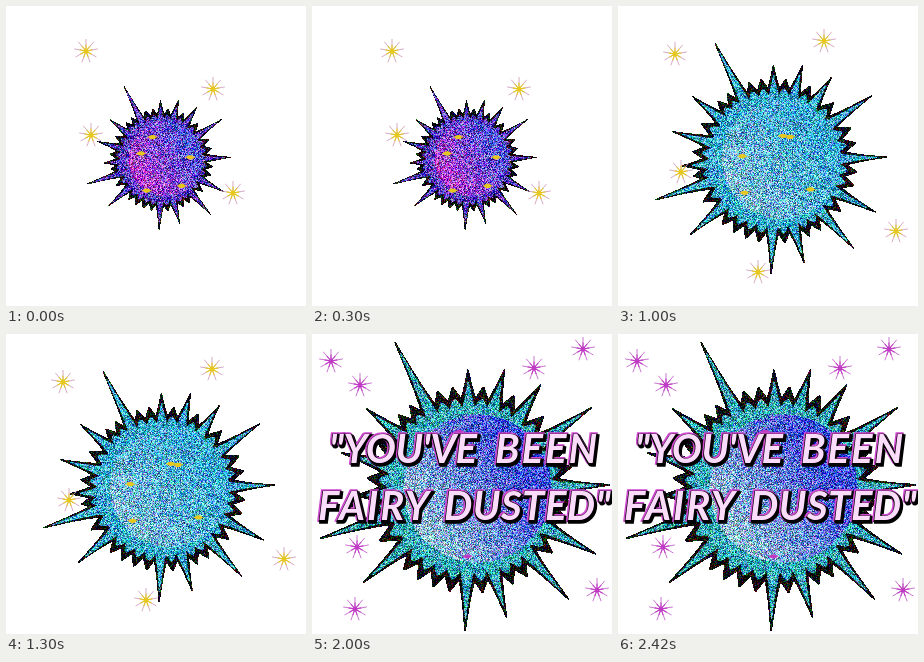
These frames come from a looping animation (300x300 px, 2.7 s). An HTML page with a canvas:

```html
<!DOCTYPE html>
<html lang="en">
<head>
<meta charset="utf-8">
<title>Fairy dust</title>
<style>
html, body { margin: 0; width: 100%; height: 100%; overflow: hidden; background: #fff; }
canvas { display: block; }
</style>
</head>
<body>
<canvas id="stage" width="300" height="300"></canvas>
<script>
const SIZE = 300, RADIUS = 70, TAU = Math.PI * 2;

// Long spikes as [angle in degrees, reach]; short ones fill the gaps between them.
const LONG_SPIKES = [[-2, 112], [27, 113], [48, 118], [74, 106], [92, 113], [139, 113], [162, 126],
  [177, 93], [196, 107], [218, 105], [243, 132], [269, 96], [286, 100], [304, 101], [326, 117]];
const SPIKES = LONG_SPIKES.flatMap(([angle, reach], i) => {
  const next = LONG_SPIKES[i + 1]?.[0] ?? LONG_SPIKES[0][0] + 360;
  const steps = Math.round((next - angle) / 9.5);
  return Array.from({ length: steps }, (_, k) =>
    [(angle + (next - angle) * k / steps) * TAU / 360, k ? 83 : reach]);
});

const GOLD = { ray: '#d3a0c0', core: '#e6c81e', edge: '#e8c93c', fill: '#fff3b0' };
const PINK = { ray: '#c568cc', core: '#c03cc4', edge: '#d048d0', fill: '#fbdcfa' };
const LAST_STARS = [[19, 27], [48, 51], [222, 34], [271, 15], [45, 213], [43, 275], [285, 256]];

// ball: shades from lower left to upper right
const SCENES = [
  { hold: 500, scale: .625, body: '#5c3cc8', ball: ['#b43cd0', '#4c50e0'], tint: GOLD,
    stars: [[80, 45], [207, 83], [85, 129], [227, 187]] },
  { hold: 500, scale: .828, body: '#b83cc8', ball: ['#c040cc', '#b03cc8'], tint: GOLD,
    stars: [[86, 85], [232, 76], [267, 175], [52, 222], [197, 243]] },
  { hold: 500, scale: 1, body: '#34a8d0', ball: ['#7cb8dc', '#38a8dc'], tint: GOLD,
    stars: [[57, 48], [206, 35], [63, 166], [278, 225], [140, 266]] },
  { hold: 500, scale: 1.254, body: '#b23cc0', ball: ['#c44cc8', '#b840bc'], tint: GOLD,
    stars: LAST_STARS, text: true },
  { hold: 700, scale: 1.254, body: '#32a6b8', ball: ['#92bedc', '#3448e2'], tint: PINK,
    stars: LAST_STARS, text: true }
];
const LOOP = SCENES.reduce((sum, scene) => sum + scene.hold, 0);

function makeRandom(seed) {
  return () => {
    seed = (seed + 0x6D2B79F5) | 0;
    let t = Math.imul(seed ^ (seed >>> 15), 1 | seed);
    t = (t + Math.imul(t ^ (t >>> 7), 61 | t)) ^ t;
    return ((t ^ (t >>> 14)) >>> 0) / 4294967296;
  };
}

function disc(g, x, y, r, fill) {
  g.fillStyle = fill;
  g.beginPath();
  g.arc(x, y, r, 0, TAU);
  g.fill();
}

function burstLayer(g, color, inset) {
  const base = RADIUS - inset, half = 8.5 - inset * .6;
  disc(g, 0, 0, base, color);
  for (const [angle, reach] of SPIKES) {
    g.save();
    g.rotate(angle);
    g.beginPath();
    g.moveTo(base - 3, -half);
    g.quadraticCurveTo(base + 5, -half * .55, reach - inset * 2.5, -.6);
    g.lineTo(reach - inset * 2.5, .6);
    g.quadraticCurveTo(base + 5, half * .55, base - 3, half);
    g.fill();
    g.restore();
  }
}

function drawBurst(g, { scale, body, ball }) {
  g.save();
  g.translate(153, 152);
  g.scale(scale, scale);
  g.translate(4, 3);
  burstLayer(g, '#000', 0);
  burstLayer(g, body, 4);
  const shade = g.createLinearGradient(-40, 24, 42, -30);
  ball.forEach((color, i) => shade.addColorStop(i, color));
  disc(g, 6, -1, 59, shade);
  g.restore();
}

function addGlitter(g, random) {
  const image = g.getImageData(0, 0, SIZE, SIZE), d = image.data;
  for (let i = 0; i < d.length; i += 4) {
    d[i + 3] = d[i + 3] > 110 ? 255 : 0;
    const dark = d[i] + d[i + 1] + d[i + 2] < 90;
    const light = dark ? -90 : (random() - .5) * 170;
    for (let c = 0; c < 3; c++) d[i + c] += light + (random() - .5) * (dark ? 420 : 140);
  }
  g.putImageData(image, 0, 0);
}

function drawStar(g, x, y, { ray, core }) {
  const rays = (color, width, length) => {
    g.strokeStyle = color;
    g.lineWidth = width;
    g.beginPath();
    for (let i = 0; i < 9; i++) {
      const a = i * TAU / 9 - TAU / 4;
      g.moveTo(x, y);
      g.lineTo(x + Math.cos(a) * length, y + Math.sin(a) * length);
    }
    g.stroke();
  };
  rays(ray, .9, 12);
  rays(core, 1.1, 6.5);
  disc(g, x, y, 2.4, core);
}

function drawGlints(g, { scale, tint }, random) {
  for (let i = 0; i < 5; i++) {
    const a = (i + random()) * TAU / 5, r = (20 + 38 * random()) * scale;
    g.save();
    g.translate(157 + Math.cos(a) * r, 154 + Math.sin(a) * r);
    g.scale(1, .6);
    disc(g, 0, 0, 3.5, tint.core);
    g.fillRect(-5, -.8, 10, 1.6);
    g.restore();
  }
}

function drawWord(g, word, x, y, spacing, { edge, fill }) {
  const outline = (color, width, shift) => {
    g.strokeStyle = color;
    g.lineWidth = width;
    g.strokeText(word, x + shift, y + shift);
  };
  g.font = 'italic 700 40px Lato, sans-serif';
  g.letterSpacing = spacing + 'px';
  g.miterLimit = 3;
  outline('#000', 3.5, 1.5);
  outline(edge, 3.5, -.5);
  outline('#000', 2.5, .5);
  g.fillStyle = fill;
  g.fillText(word, x, y);
}

function paint(scene, index) {
  const canvas = document.createElement('canvas');
  canvas.width = canvas.height = SIZE;
  const g = canvas.getContext('2d'), random = makeRandom(index + 7);
  drawBurst(g, scene);
  addGlitter(g, random);
  scene.stars.forEach(([x, y]) => drawStar(g, x, y, scene.tint));
  drawGlints(g, scene, random);
  if (scene.text) {
    drawWord(g, '"YOU\'VE', 17, 129, -.5, scene.tint);
    drawWord(g, 'BEEN', 183, 129, 2, scene.tint);
    drawWord(g, 'FAIRY', 6, 186, 2, scene.tint);
    drawWord(g, 'DUSTED"', 132, 186, .5, scene.tint);
  }
  return canvas;
}

const pictures = SCENES.map(paint);
const stage = document.getElementById('stage').getContext('2d');

function render(time) {
  let t = time % LOOP, i = 0;
  while (t >= SCENES[i].hold) t -= SCENES[i++].hold;
  stage.fillStyle = '#fff';
  stage.fillRect(0, 0, SIZE, SIZE);
  stage.drawImage(pictures[i], 0, 0);
}

const start = performance.now();
function tick() {
  render(performance.now() - start);
  requestAnimationFrame(tick);
}
tick();
</script>
</body>
</html>
```
